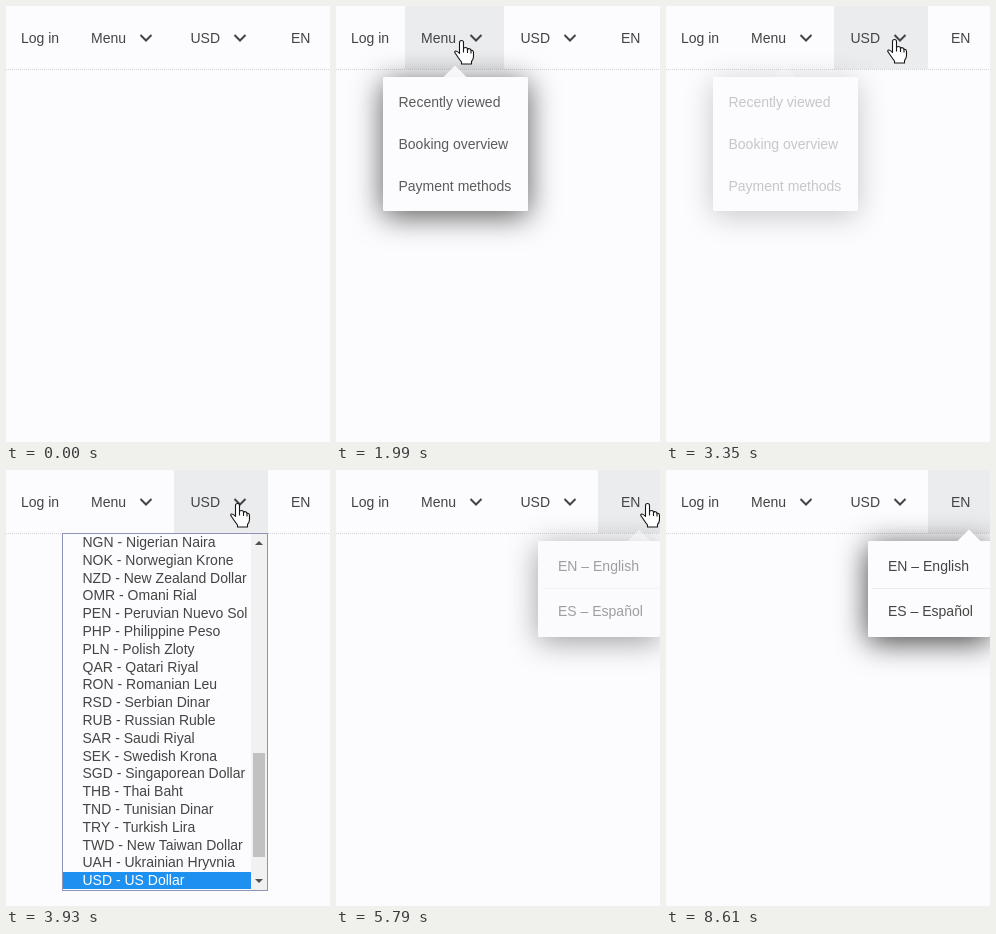
An HTML page with a canvas for the animation above (8650 ms loop, 324 px wide and 436 px high).

```html
<!DOCTYPE html>
<html lang="en">
<head>
<meta charset="utf-8">
<title>Navigation menus</title>
<style>
  html, body { margin: 0; width: 100%; height: 100%; overflow: hidden; background: #fcfcfe; }
  canvas { display: block; width: 324px; height: 436px; }
</style>
</head>
<body>
<canvas id="stage"></canvas>
<script>
const W = 324, H = 436, LOOP = 8650;
const canvas = document.getElementById('stage');
const ctx = canvas.getContext('2d');
const ratio = window.devicePixelRatio || 1;
canvas.width = W * ratio;
canvas.height = H * ratio;

const INK = '#444444', HOVER = '#ebecee', PAGE = '#fcfcfe';

const TABS = [
  { label: 'Log in', x: 15, left: 0, right: 69, from: 1290, to: 1680 },
  { label: 'Menu', x: 85, left: 69, right: 168, from: 1680, to: 3140, chevron: 140 },
  { label: 'USD', x: 184.5, left: 168, right: 262, from: 3140, to: 5020, chevron: 234 },
  { label: 'EN', x: 285, left: 262, right: 324, from: 5020, to: LOOP + 500 }
];

const PANELS = [
  { x: 47, y: 71, w: 145, h: 134, tip: 119, textX: 62.5, from: 1780, to: 3180,
    items: [['Recently viewed', 101], ['Booking overview', 143], ['Payment methods', 185]] },
  { x: 202, y: 71, w: 122, h: 96, tip: 303, textX: 222, from: 5670, to: LOOP + 500, rule: 118,
    items: [['EN – English', 101], ['ES – Español', 146]] }
];

const CURRENCIES = [
  'NGN - Nigerian Naira', 'NOK - Norwegian Krone', 'NZD - New Zealand Dollar',
  'OMR - Omani Rial', 'PEN - Peruvian Nuevo Sol', 'PHP - Philippine Peso',
  'PLN - Polish Zloty', 'QAR - Qatari Riyal', 'RON - Romanian Leu',
  'RSD - Serbian Dinar', 'RUB - Russian Ruble', 'SAR - Saudi Riyal',
  'SEK - Swedish Krona', 'SGD - Singaporean Dollar', 'THB - Thai Baht',
  'TND - Tunisian Dinar', 'TRY - Turkish Lira', 'TWD - New Taiwan Dollar',
  'UAH - Ukrainian Hryvnia', 'USD - US Dollar'
];

// Pointer stops: time, x, y
const POINTER = [
  [1080, -14, 105], [1530, 34, 38], [1900, 125, 34], [2940, 125, 34],
  [3400, 231, 33], [4800, 231, 33], [5280, 311, 33], [6560, 311, 33],
  [7100, 307, 69], [7430, 307, 69], [8220, 332, 222]
];

const HAND = new Path2D('M-2 2Q-2 0 0 0Q2 0 2 2V8Q2 7 4 7Q6 7 6 9Q6.3 8 8 8.2Q9.5 8.5 9.5 10' +
  'Q10 9.6 11 10Q12 10.5 12 12V16Q12 19 10 21V23.5H0V21.5Q-2 19 -4 16L-6 13Q-7.5 11 -6 10.5Q-4.5 10 -2 13Z');
const KNUCKLES = new Path2D('M2 8V12M6 9V12.5M9.5 10V13');
const ARROW = new Path2D('M0 0V17L4 13.3L6.8 19.5L9.4 18.4L6.7 12.3H12Z');

const clamp = v => Math.min(1, Math.max(0, v));
const ease = v => v * v * (3 - 2 * v);
const fade = (t, from, to, span) => Math.min(clamp((t - from) / span), 1 - clamp((t - to) / span));

function rect(x, y, w, h, color) {
  ctx.fillStyle = color;
  ctx.fillRect(x, y, w, h);
}

function text(str, x, y, color = INK) {
  ctx.fillStyle = color;
  ctx.fillText(str, x, y);
}

function chevron(x) {
  ctx.beginPath();
  ctx.moveTo(x - 5.5, 29);
  ctx.lineTo(x, 34.5);
  ctx.lineTo(x + 5.5, 29);
  ctx.lineWidth = 2;
  ctx.strokeStyle = INK;
  ctx.stroke();
}

function drawTabs(t) {
  for (const tab of TABS) {
    ctx.globalAlpha = fade(t, tab.from, tab.to, 80);
    rect(tab.left, 0, tab.right - tab.left, 63, HOVER);
  }
  ctx.globalAlpha = 1;
  for (let x = 0; x < W; x += 2) rect(x, 63, 1, 1, '#d4d4d8');
}

function drawLabels() {
  for (const tab of TABS) {
    text(tab.label, tab.x, 37);
    if (tab.chevron) chevron(tab.chevron);
  }
}

function panelShape(p) {
  const shape = new Path2D();
  shape.roundRect(p.x, p.y, p.w, p.h, 2);
  return shape;
}

// The shadow is kept outside the panel so that fading does not show it through.
function drawShadow(p, alpha) {
  const shape = panelShape(p);
  const outside = new Path2D(shape);
  outside.rect(0, 0, W, H);
  ctx.save();
  ctx.clip(outside, 'evenodd');
  ctx.globalAlpha = alpha;
  ctx.shadowColor = 'rgba(0, 0, 0, .75)';
  ctx.shadowBlur = 30 * ratio;
  ctx.shadowOffsetY = 5 * ratio;
  ctx.fillStyle = '#fff';
  ctx.fill(shape);
  ctx.restore();
}

function drawPanel(p, alpha) {
  ctx.globalAlpha = alpha;
  ctx.fillStyle = '#fcfcfe';
  ctx.fill(panelShape(p));
  ctx.beginPath();
  ctx.moveTo(p.tip - 12, p.y + 0.5);
  ctx.lineTo(p.tip, p.y - 11.5);
  ctx.lineTo(p.tip + 12, p.y + 0.5);
  ctx.fill();
  if (p.rule) rect(p.x + 4, p.rule, p.w - 4, 1, '#ececee');
  for (const [label, y] of p.items) text(label, p.textX, y);
  ctx.globalAlpha = 1;
}

function scrollArrow(y, dir) {
  ctx.beginPath();
  ctx.moveTo(249, y - 2 * dir);
  ctx.lineTo(257, y - 2 * dir);
  ctx.lineTo(253, y + 2 * dir);
  ctx.fillStyle = '#505050';
  ctx.fill();
}

function drawCurrencyList() {
  rect(56, 63, 206, 358, '#8c95b8');
  rect(57, 64, 204, 356, PAGE);
  rect(245, 64, 16, 356, '#f1f1f1');
  rect(247, 283, 12, 104, '#c1c1c1');
  scrollArrow(73, -1);
  scrollArrow(411, 1);
  rect(57, 402, 188, 17, '#1e90f0');
  CURRENCIES.forEach((name, i) => {
    const last = i === CURRENCIES.length - 1;
    text(name, 76.5, Math.round(77 + i * 17.8), last ? '#fff' : INK);
  });
}

function pointerAt(t) {
  const n = POINTER.findIndex(stop => stop[0] > t);
  if (n < 1) return null;
  const [t0, x0, y0] = POINTER[n - 1], [t1, x1, y1] = POINTER[n];
  const k = ease((t - t0) / (t1 - t0));
  return { x: x0 + (x1 - x0) * k, y: y0 + (y1 - y0) * k };
}

function drawPointer(t) {
  const pos = pointerAt(t);
  if (!pos) return;
  const onLink = pos.y < 63 || (t > 7430 && pos.y > 74 && pos.y < 167);
  const shape = onLink ? HAND : ARROW;
  ctx.save();
  ctx.translate(Math.round(pos.x) + 0.5, Math.round(pos.y) + 0.5);
  ctx.fillStyle = '#fff';
  ctx.strokeStyle = '#151515';
  ctx.lineWidth = 1.1;
  ctx.lineJoin = 'round';
  ctx.fill(shape);
  ctx.stroke(shape);
  if (onLink) ctx.stroke(KNUCKLES);
  ctx.restore();
}

function draw(t) {
  ctx.setTransform(ratio, 0, 0, ratio, 0, 0);
  ctx.font = '14px "Liberation Sans", Arial, sans-serif';
  rect(0, 0, W, H, PAGE);

  drawTabs(t);
  const open = PANELS.map(p => [p, fade(t, p.from, p.to, 240)]).filter(([, a]) => a > 0);
  for (const [p, a] of open) drawShadow(p, a);
  drawLabels();
  for (const [p, a] of open) drawPanel(p, a);
  if (t >= 3930 && t < 4800) drawCurrencyList();
  drawPointer(t);
}

const start = performance.now();
function tick() {
  draw((performance.now() - start) % LOOP);
  requestAnimationFrame(tick);
}
tick();
</script>
</body>
</html>
```
